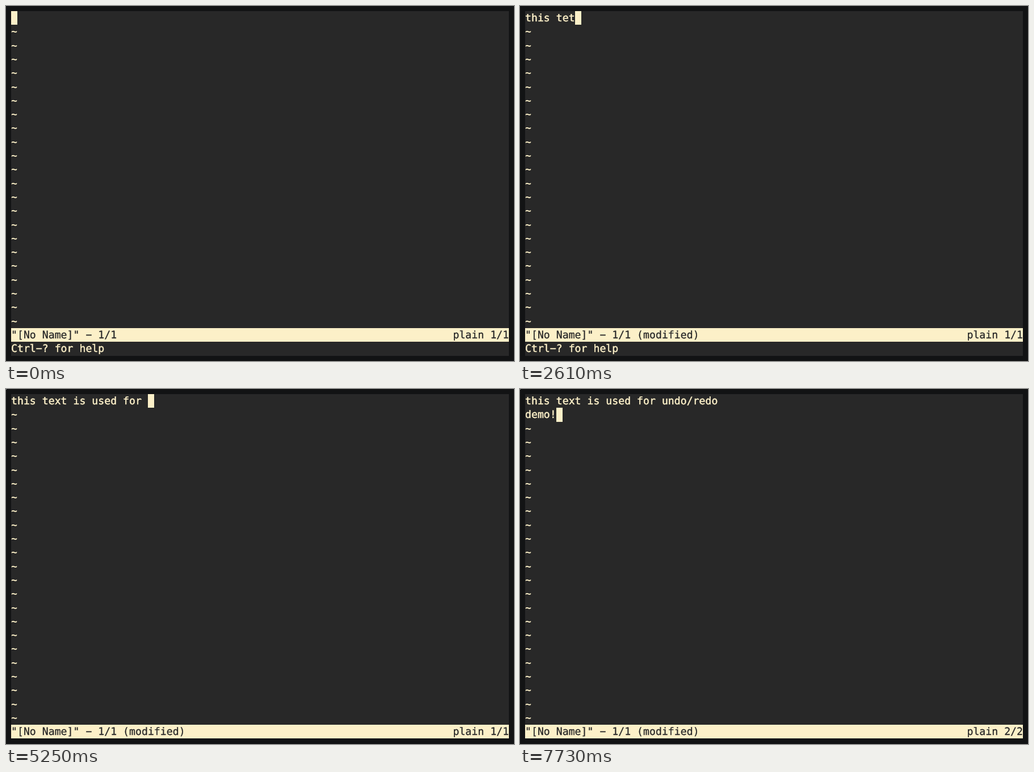
Recreate the animation shown at these times as an HTML page. Size 895 by 626 pixels, loop 8 s.

```html
<!DOCTYPE html>
<html lang="en">
<head>
<meta charset="utf-8">
<title>Text editor</title>
<style>
  :root { --bg: #282828; --fg: #fcf0c8; --w: 10.957px; --h: 24.3px; }
  html, body { margin: 0; width: 100%; height: 100%; overflow: hidden; background: #121314; }
  #dot { position: absolute; left: 0; top: 0; width: 1px; height: 1px; background: #aaa; }
  #term {
    position: absolute; left: 9px; top: 9px; width: 877px; height: 608px;
    background: var(--bg); color: var(--fg);
    font: 18.2px/25px "DejaVu Sans Mono", monospace;
    text-rendering: geometricPrecision; font-variant-ligatures: none;
    -webkit-text-stroke: .5px currentColor;
  }
  .row { position: absolute; left: 0; width: 100%; height: var(--h); white-space: pre; }
  .empty { font-weight: bold; -webkit-text-stroke: 0; }
  #cursor { position: absolute; width: var(--w); height: var(--h); background: var(--fg); }
  #status { background: var(--fg); color: var(--bg); -webkit-text-stroke: .3px currentColor; }
  #pos { position: absolute; right: 0; top: 0; }
</style>
</head>
<body>
<div id="dot"></div>
<div id="term">
  <div id="cursor"></div>
  <div id="status" class="row"><span id="name"></span><span id="pos"></span></div>
</div>
<script>
const LOOP = 8000, CELL = 10.957, LINE = 24.3, ROWS = 25;
const HELP_OFF = 3910, BAR_DOWN = 3970, DOT_ON = 3070;
const $ = id => document.getElementById(id);

// Typing log: from each time on, the buffer holds this text.
const log = [[0, ""]];
function type(text, from, to, start, steps) {
  const n = text.length - start;
  for (let i = 1; i <= steps; i++) {
    const t = steps > 1 ? from + (to - from) * (i - 1) / (steps - 1) : from;
    log.push([t, text.slice(0, start + Math.round(n * i / steps))]);
  }
}
const full = "this text is used for undo/redo\ndemo!";
const upTo = n => full.slice(0, n);

type("this ", 530, 910, 0, 5);
type("this t", 1100, 1100, 5, 1);
log.push([1560, ""]);
type("this tet", 2090, 2610, 0, 5);
log.push([3070, "this te"]);
type(upTo(9), 3200, 3330, 7, 2);
type(upTo(13), 3530, 3780, 9, 4);
type(upTo(16), 4230, 4290, 13, 2);
type(upTo(18), 4480, 4540, 16, 2);
type(upTo(22), 5070, 5250, 18, 4);
type(upTo(26), 5910, 6100, 22, 3);
type(upTo(31), 6300, 6560, 26, 4);
log.push([6750, upTo(32)]);
type(upTo(36), 6940, 7200, 32, 3);
log.push([7730, full]);

const rows = Array.from({ length: ROWS }, (_, i) => {
  const row = document.createElement("div");
  row.className = "row";
  row.style.top = i * LINE + "px";
  $("term").insertBefore(row, $("cursor"));
  return row;
});

function setText(el, text) {
  if (el.textContent !== text) el.textContent = text;
}

function draw(t) {
  const text = log.findLast(entry => entry[0] <= t)[1];
  const lines = text.split("\n");
  const bar = t < BAR_DOWN ? ROWS - 2 : ROWS - 1;
  rows.forEach((row, i) => {
    let line = lines[i] ?? "~";
    if (i === bar) line = "";
    if (i > bar) line = t < HELP_OFF ? "Ctrl\u2212? for help" : "";
    setText(row, line);
    row.classList.toggle("empty", line === "~");
  });
  const y = lines.length - 1;
  $("cursor").style.left = lines[y].length * CELL + "px";
  $("cursor").style.top = y * LINE + "px";
  $("status").style.top = bar * LINE + "px";
  setText($("name"), '"[No Name]" \u2212 1/1' + (t < 530 ? "" : " (modified)"));
  setText($("pos"), `plain ${lines.length}/${lines.length}`);
  $("dot").hidden = t < DOT_ON;
}

const begin = performance.now();
function tick() {
  draw((performance.now() - begin) % LOOP);
  requestAnimationFrame(tick);
}
draw(0);
requestAnimationFrame(tick);
</script>
</body>
</html>
```
